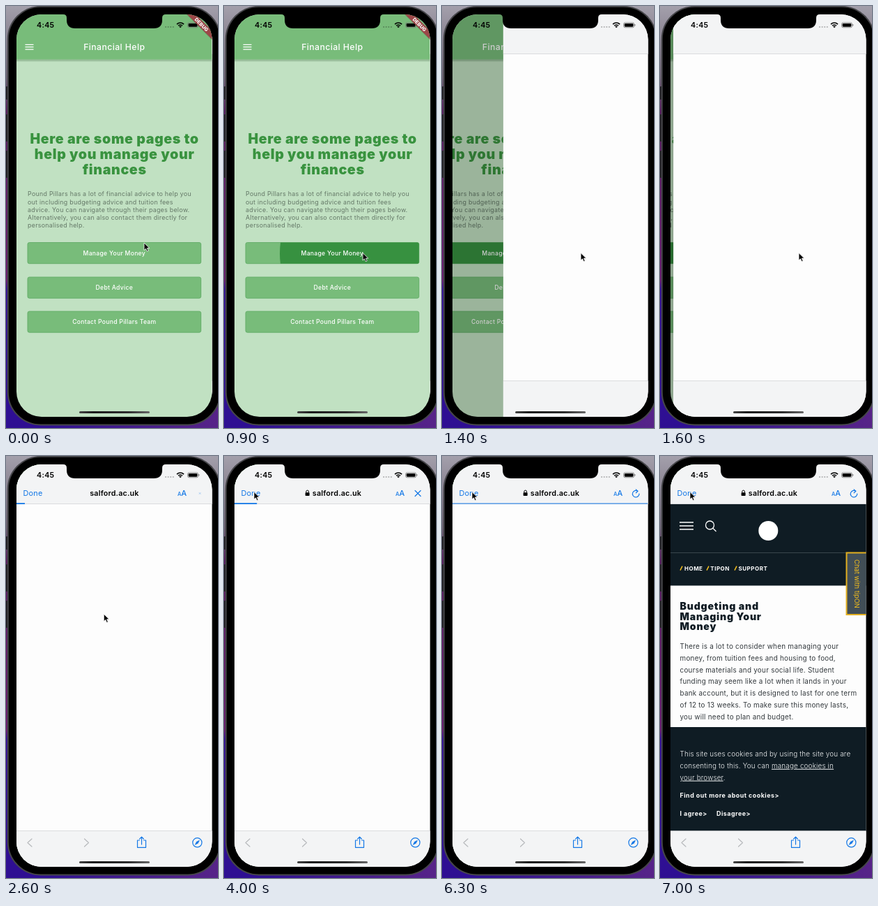
Recreate the animation shown at these times as an HTML page. Size 304 by 604 pixels, loop 7.1 s.

```html
<!DOCTYPE html>
<html lang="en">
<head>
<meta charset="utf-8">
<title>Financial help</title>
<style>
html, body { margin: 0; width: 100%; height: 100%; overflow: hidden; background: #000; }
svg { display: block; width: 304px; height: 604px; }
text { font-family: Inter, Roboto, sans-serif; white-space: pre; }
.mid { text-anchor: middle; }
.title { font-size: 12.2px; font-weight: 500; fill: #fff; letter-spacing: .45px; }
.h1 { font-size: 19.6px; font-weight: 900; fill: #39933f; letter-spacing: .65px; }
.body { font-size: 8.9px; fill: #647867; letter-spacing: .26px; }
.btn text { font-size: 8.6px; font-weight: 500; fill: #fff; letter-spacing: .28px; }
.btn rect { fill: #78bc7a; stroke: #63ad68; stroke-width: .9; }
.blue { fill: #1478e6; }
.ico { fill: none; stroke: #1478e6; stroke-width: 1.2; stroke-linecap: round; stroke-linejoin: round; }
.off { stroke: #b7b9bc; }
.crumb { font-size: 8px; font-weight: 700; fill: #fff; letter-spacing: .5px; }
.h2 { font-size: 14.1px; font-weight: 900; fill: #101c24; letter-spacing: .8px; }
.para { font-size: 9.9px; fill: #33393d; letter-spacing: .26px; }
.note { font-size: 9.9px; font-weight: 300; fill: #f2f4f5; letter-spacing: .17px; }
.link { font-size: 8.9px; font-weight: 700; fill: #fff; letter-spacing: .5px; }
.u { text-decoration: underline; }
</style>
</head>
<body>
<svg viewBox="0 0 304 604">
  <defs>
    <linearGradient id="wall" x2="0" y2="1">
      <stop offset="0" stop-color="#a39fab"/>
      <stop offset=".17" stop-color="#6d6474"/>
      <stop offset=".25" stop-color="#571a5e"/>
      <stop offset=".65" stop-color="#6c1972"/>
      <stop offset=".67" stop-color="#340f9a"/>
      <stop offset="1" stop-color="#2e0f92"/>
    </linearGradient>
    <linearGradient id="floor">
      <stop offset="0" stop-color="#2e0f92"/>
      <stop offset="1" stop-color="#572388"/>
    </linearGradient>
    <linearGradient id="shade" x2="0" y2="1">
      <stop offset="0" stop-color="#2d5c30" stop-opacity=".4"/>
      <stop offset="1" stop-color="#2d5c30" stop-opacity="0"/>
    </linearGradient>
    <linearGradient id="homeBar">
      <stop offset="0" stop-color="#444"/>
      <stop offset=".2" stop-color="#1a1a1a"/>
      <stop offset=".7" stop-color="#2c2c2c"/>
      <stop offset="1" stop-color="#666"/>
    </linearGradient>
    <clipPath id="screen"><rect x="15" y="12" width="280.5" height="576" rx="36"/></clipPath>
    <clipPath id="tap"><rect x="31" y="338.5" width="248.6" height="30.2" rx="2.5"/></clipPath>
  </defs>

  <!-- desktop and phone body -->
  <rect width="304" height="604" fill="url(#wall)"/>
  <rect y="540" x="60" width="244" height="64" fill="url(#floor)"/>
  <g fill="#1d1b20">
    <rect y="115" width="4" height="19" rx="1"/>
    <rect y="155" width="4" height="39" rx="1"/>
    <rect y="207" width="4" height="39" rx="1"/>
  </g>
  <rect x="2.8" y=".8" width="304.6" height="598.6" rx="47" fill="#000" stroke="#46464a" stroke-width="2"/>

  <g clip-path="url(#screen)">
    <!-- app page -->
    <g id="app">
      <rect x="15" y="12" width="281" height="576" fill="#c1e1c2"/>
      <rect x="15" y="76.5" width="281" height="4" fill="url(#shade)"/>
      <rect x="15" y="12" width="281" height="64.5" fill="#78bc7a"/>
      <path d="M27.5 55.3h12M27.5 58.7h12M27.5 62.1h12" stroke="#fff" stroke-width="1.3"/>
      <text class="title mid" x="155.3" y="62.8">Financial Help</text>
      <g class="h1 mid">
        <text x="155.6" y="196.8">Here are some pages to</text>
        <text x="155.6" y="219.1">help you manage your</text>
        <text x="155.6" y="241.4">finances</text>
      </g>
      <g class="body">
        <text x="31" y="272.4">Pound Pillars has a lot of financial advice to help you</text>
        <text x="31" y="283.6">out including budgeting advice and tuition fees</text>
        <text x="31" y="294.8">advice. You can navigate through their pages below.</text>
        <text x="31" y="306">Alternatively, you can also contact them directly for</text>
        <text x="31" y="317.2">personalised help.</text>
      </g>
      <g class="btn mid">
        <rect x="31" y="338.5" width="248.6" height="30.2" rx="2.5"/>
        <circle id="ripple" cx="200" cy="354" fill="#379140" clip-path="url(#tap)"/>
        <rect x="31" y="388" width="248.6" height="30.2" rx="2.5"/>
        <rect x="31" y="437" width="248.6" height="30.2" rx="2.5"/>
        <text x="155.3" y="356.8">Manage Your Money</text>
        <text x="155.3" y="406">Debt Advice</text>
        <text x="155.3" y="455.2">Contact Pound Pillars Team</text>
      </g>
    </g>
    <rect id="dim" x="15" y="12" width="281" height="576"/>

    <!-- browser sheet -->
    <g id="sheet">
      <rect x="15" y="12" width="281" height="576" fill="#fdfdfd"/>
      <g id="site">
        <path d="M15 69h281v116.5H15zM15 388h281v149H15z" fill="#0f1c24"/>
        <path d="M15 138.5h281" stroke="#39464d"/>
        <path d="M28 95h20M28 100h20M28 105h20" stroke="#fff" stroke-width="1.6"/>
        <circle cx="71.5" cy="99" r="6" fill="none" stroke="#fff" stroke-width="1.3"/>
        <path d="M76 103.5l4.5 4.5" stroke="#fff" stroke-width="1.3"/>
        <circle cx="155.3" cy="107" r="14" fill="#fff"/>
        <path d="M29 163.7l3-6M67 163.7l3-6M107 163.7l3-6" stroke="#f2bd1d" stroke-width="1.5"/>
        <g class="crumb">
          <text x="35" y="163.6">HOME</text>
          <text x="72.3" y="163.6">TIPON</text>
          <text x="112.5" y="163.6">SUPPORT</text>
        </g>
        <g class="h2">
          <text x="28.5" y="219.8">Budgeting and</text>
          <text x="28.5" y="234.6">Managing Your</text>
          <text x="28.5" y="249.4">Money</text>
        </g>
        <g class="para">
          <text x="28.5" y="276">There is a lot to consider when managing your</text>
          <text x="28.5" y="292.8">money, from tuition fees and housing to food,</text>
          <text x="28.5" y="309.6">course materials and your social life. Student</text>
          <text x="28.5" y="326.4">funding may seem like a lot when it lands in your</text>
          <text x="28.5" y="343.2">bank account, but it is designed to last for one term</text>
          <text x="28.5" y="360">of 12 to 13 weeks. To make sure this money lasts,</text>
          <text x="28.5" y="376.8">you will need to plan and budget.</text>
        </g>
        <g class="note">
          <text x="28.5" y="430">This site uses cookies and by using the site you are</text>
          <text x="28.5" y="446.8">consenting to this. You can <tspan class="u">manage cookies in</tspan></text>
          <text x="28.5" y="463.6"><tspan class="u">your browser</tspan>.</text>
        </g>
        <g class="link">
          <text x="28.5" y="489">Find out more about cookies&gt;</text>
          <text x="28.5" y="514.5">I agree&gt;</text>
          <text x="81" y="514.5">Disagree&gt;</text>
        </g>
        <rect x="267.5" y="138.5" width="30" height="88.5" fill="#414e56" stroke="#e3b020" stroke-width="2"/>
        <text class="mid" transform="translate(279 183) rotate(90)" font-size="9.4" fill="#f2bd1d">Chat with tipON</text>
      </g>
      <path d="M15 12h281v56.5H15zM15 537h281v51H15z" fill="#f3f4f5"/>
      <path d="M15 68.5h281M15 536.5h281" stroke="#d3d5d7" stroke-width=".8"/>
      <g id="tools">
        <text class="blue" x="24.5" y="56.8" font-size="10.9" letter-spacing=".2">Done</text>
        <g id="host">
          <g id="lock">
            <rect x="110" y="52.3" width="6" height="4.8" rx=".8"/>
            <path d="M111.2 52.5v-1.6a1.8 1.8 0 0 1 3.6 0v1.6" fill="none" stroke="#000"/>
          </g>
          <text class="mid" x="155.4" y="56.8" font-size="10.7" font-weight="600" letter-spacing=".2">salford.ac.uk</text>
        </g>
        <text class="blue" x="246" y="57" font-size="7.4" font-weight="500">A<tspan font-size="11">A</tspan></text>
        <path id="stop" class="ico" d="M-4-4l8 8M4-4l-8 8"/>
        <path id="reload" class="ico" d="M280.7 50.2A4.8 4.8 0 1 0 282.8 54M278 48l2.9 2.3-2.7 2.5"/>
        <path class="ico off" d="M37 548l-6 5.5 6 5.5M112.5 548l6 5.5-6 5.5"/>
        <path class="ico" d="M191.5 550h-3v10.3h12V550h-3M194.5 556v-10.5M191.7 548l2.8-2.8 2.8 2.8"/>
        <circle class="ico" cx="274.3" cy="553.3" r="6.6"/>
        <path class="blue" d="M278 549.6l-2.5 5-5 2.5 2.5-5z"/>
      </g>
      <rect id="bar" class="blue" x="15" y="67.2" height="1.8"/>
    </g>

    <!-- system overlay -->
    <text x="44" y="30.8" font-size="10.7" font-weight="600" letter-spacing=".3">4:45</text>
    <g fill="#000" fill-opacity=".28">
      <circle cx="229" cy="30" r="1.1"/><circle cx="232.6" cy="30" r="1.1"/>
      <circle cx="236.2" cy="30" r="1.1"/><circle cx="239.8" cy="30" r="1.1"/>
    </g>
    <path d="M245 26.1a7 7 0 0 1 10 0M247 28.2a4.2 4.2 0 0 1 6 0" fill="none" stroke="#000" stroke-width="1.6"/>
    <path d="M248.2 29.4a2.6 2.6 0 0 1 3.6 0L250 31.2z"/>
    <rect x="260.5" y="23.8" width="15" height="7" rx="2" fill="none" stroke="#777" stroke-width=".8"/>
    <rect x="261.6" y="24.9" width="12.8" height="4.8" rx="1.1"/>
    <path d="M276.8 26v2.6" stroke="#777"/>
    <g id="banner" transform="translate(295 12) rotate(45)">
      <rect x="-30" y="15.7" width="60" height="10" fill="#000" opacity=".15"/>
      <rect x="-30" y="16.3" width="60" height="8.7" fill="#9c4748"/>
      <text class="mid" y="23.2" font-size="7" font-weight="800" fill="#fff">DEBUG</text>
    </g>
    <rect x="105" y="580" width="101" height="3" rx="1.5" fill="url(#homeBar)"/>
  </g>
  <path d="M82 11h147v1q-5 0-5 5v3q0 12-12 12H99q-12 0-12-12v-3q0-5-5-5z"/>
  <path id="cursor" d="M0 0v10.6l2.5-2.3 1.7 3.9 1.9-.8-1.7-3.8h3.4z" stroke="#fff" stroke-width=".8"/>
</svg>
<script>
const LOOP = 7100, WIDTH = 280;
const el = {};
document.querySelectorAll("svg [id]").forEach(n => el[n.id] = n);

const clamp = v => Math.min(1, Math.max(0, v));
const smooth = v => v * v * (3 - 2 * v);
const span = (t, a, b) => clamp((t - a) / (b - a));
const show = (node, on) => node.setAttribute("display", on ? "inline" : "none");
const move = (node, x, y, s = 1) =>
  node.setAttribute("transform", `translate(${x} ${y}) scale(${s})`);

// keys: [time, value, value...]
function track(keys, t, ease = v => v) {
  let i = 0;
  while (i < keys.length - 2 && t >= keys[i + 1][0]) i++;
  const [a, b] = [keys[i], keys[i + 1]];
  const k = ease(span(t, a[0], b[0]));
  return a.slice(1).map((v, j) => v + (b[j + 1] - v) * k);
}

const pointer = [
  [50, 198, 339], [320, 199, 353.5], [2350, 199, 353.5], [2500, 144, 243],
  [2620, 140, 225], [2800, 140, 225], [3050, 123, 195], [3200, 123, 195], [3900, 43, 51.5]
];
const loading = [
  [2350, 0], [2600, 12], [4000, 32], [4700, 185], [5800, WIDTH]
];
const ripple = [[560, 0], [900, 120], [1150, 120], [1300, 140], [1500, 190]];

// critically damped spring
function slide(t) {
  const u = Math.max(0, t - 1252) * 0.0177;
  return t > 1900 ? 1 : 1 - (1 + u) * Math.exp(-u);
}

function draw(t) {
  const p = slide(t);
  move(el.app, -72 * p, 0);
  move(el.sheet, WIDTH * (1 - p), 0);
  el.dim.setAttribute("opacity", 0.27 * p);
  show(el.banner, t < 1250);
  el.ripple.setAttribute("r", track(ripple, t)[0]);

  const secure = t >= 2900, loaded = t >= 5900;
  show(el.tools, t >= 2100);
  show(el.lock, secure);
  move(el.host, secure ? 6.6 : 0, 0);
  move(el.stop, 278, 53.5, span(t, 2550, 2750));
  show(el.stop, t > 2550 && !loaded);
  show(el.reload, loaded);

  el.bar.setAttribute("width", track(loading, t)[0]);
  el.bar.setAttribute("opacity", 1 - span(t, 6150, 6500));
  show(el.site, t >= 6500);

  move(el.cursor, ...track(pointer, t, smooth));
}

const start = performance.now();
function tick() {
  draw((performance.now() - start) % LOOP);
  requestAnimationFrame(tick);
}
tick();
</script>
</body>
</html>
```
